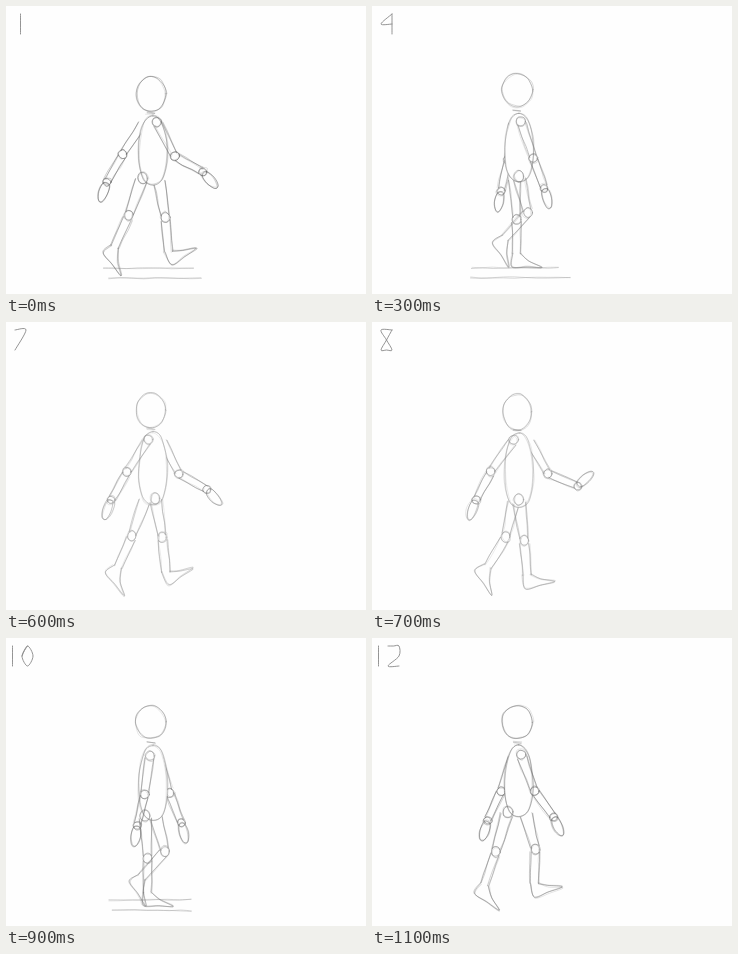
An HTML page with a canvas for the animation above (1200 ms loop, 360 px wide and 288 px high).

```html
<!DOCTYPE html>
<html lang="en">
<head>
<meta charset="utf-8">
<title>Pencil walk cycle</title>
<style>
  html, body { margin: 0; width: 100%; height: 100%; overflow: hidden; background: #fefefe; }
  canvas { display: block; width: 360px; height: 288px; }
</style>
</head>
<body>
<canvas id="stage"></canvas>
<script>
const STEP = 100, COUNT = 12, TAU = Math.PI * 2;
const THIGH = 40, SHIN = 36.5, FOOT = 30, UPPER = 39, FORE = 32, HAND = 21;
const { sin, cos, hypot, round, sign, abs } = Math;

const canvas = document.getElementById('stage');
const ctx = canvas.getContext('2d');
const ratio = window.devicePixelRatio || 1;
canvas.width = 360 * ratio;
canvas.height = 288 * ratio;
ctx.scale(ratio, ratio);
ctx.lineCap = ctx.lineJoin = 'round';

// numeral strokes as walks over a 3 x 3 grid numbered like a phone keypad
const numerals = ['248624', '28', '123679', '1235987', '346/39', '3214697', '1478964', '137', '31598753', '3214639'];

// Periodic motion: mean plus cosine and sine amounts of each harmonic
function cycle(t, mean, ...parts) {
  return parts.reduce((sum, [c, s], k) => sum + c * cos((k + 1) * t) + s * sin((k + 1) * t), mean);
}

// Limb angles in degrees: 0 hangs straight down, positive swings forward
const swing = {
  thigh: t => cycle(t, 1.8, [-14.9, 5.6], [-6.9, -1.3]),
  shin: t => cycle(t, -14.9, [-15.3, -17], [5.8, -1.4], [0.4, 3.8]),
  foot: t => cycle(t, 18.8, [35.6, 20.7], [-10, 8.1], [7.5, -6.7]),
  upper: t => cycle(t, 1.1, [30.4, 13.1], [-4, -2]),
  fore: t => cycle(t, 9.8, [44.8, 16.8], [5.9, 7.9]),
  // the wrist flicks up at the very front of the swing
  hand: t => 0.7 * swing.fore(t) + 85 * Math.max(0, cos(t - TAU / 12)) ** 40
};

let seed = 1;
function rand() {
  seed = (seed * 16807) % 2147483647;
  return seed / 2147483647;
}
const jitter = amount => (rand() - 0.5) * 2 * amount;
const lerp = (a, b, t) => [a[0] + (b[0] - a[0]) * t, a[1] + (b[1] - a[1]) * t];
const gap = (a, b) => hypot(b[0] - a[0], b[1] - a[1]);
const range = (n, fn) => Array.from({ length: n }, (_, i) => fn(i));

function reach([x, y], degrees, size) {
  const a = degrees * TAU / 360;
  return [x + sin(a) * size, y + cos(a) * size];
}

function trace(pts, closed) {
  const n = pts.length;
  const at = i => closed ? pts[(i + n) % n] : pts[Math.max(0, Math.min(n - 1, i))];
  ctx.beginPath();
  ctx.moveTo(...pts[0]);
  for (let i = 0; i < (closed ? n : n - 1); i++) {
    const [p, a, b, q] = [at(i - 1), at(i), at(i + 1), at(i + 2)];
    ctx.bezierCurveTo(a[0] + (b[0] - p[0]) / 6, a[1] + (b[1] - p[1]) / 6,
      b[0] - (q[0] - a[0]) / 6, b[1] - (q[1] - a[1]) / 6, b[0], b[1]);
  }
}

function pencil(tone) {
  const g = 190 - tone * 18;
  ctx.strokeStyle = `rgb(${g},${g},${g})`;
}

// Several faint, wobbly passes over the same curve
function sketch(pts, closed = false, passes = 3) {
  for (let i = 1; i <= passes; i++) {
    const dx = jitter(i * 0.3), dy = jitter(i * 0.3), wobble = 0.25 + i * 0.2;
    ctx.lineWidth = 0.9 - i * 0.1;
    ctx.globalAlpha = 0.65 - i * 0.12;
    trace(pts.map(([x, y]) => [x + dx + jitter(wobble), y + dy + jitter(wobble)]), closed);
    ctx.stroke();
  }
  ctx.globalAlpha = 1;
}

function line(a, b, passes) {
  const n = Math.max(1, round(gap(a, b) / 11));
  sketch(range(n + 1, i => lerp(a, b, i / n)), false, passes);
}

function oval([x, y], rx, ry = rx) {
  const n = rx > 9 ? 14 : 8;
  sketch(range(n, i => [x + rx * cos(i / n * TAU), y + ry * sin(i / n * TAU)]), true);
}

// The two edge points of a limb at fraction t
function sides(a, b, t, width) {
  const k = width / 2 / (gap(a, b) || 1);
  const nx = (a[1] - b[1]) * k, ny = (b[0] - a[0]) * k;
  const [x, y] = lerp(a, b, t);
  return [[x + nx, y + ny], [x - nx, y - ny]];
}

function tube(a, b, wa, wb) {
  const top = sides(a, b, 0.08, wa), end = sides(a, b, 0.94, wb);
  top.forEach((p, i) => line(p, end[i]));
}

function arm(shoulder, t, tone, near) {
  const elbow = reach(shoulder, swing.upper(t), UPPER);
  const wrist = reach(elbow, swing.fore(t), FORE);
  const tip = reach(wrist, swing.hand(t), HAND);
  pencil(tone);
  tube(shoulder, elbow, 9, 7);
  if (near) oval(shoulder, 4.6);
  pencil(tone + 1);
  tube(elbow, wrist, 8, 7);
  oval(elbow, 4.3);
  oval(wrist, 3.9);
  const edges = [[0.08, 6], [0.55, 9], [0.95, 4]].map(([f, w]) => sides(wrist, tip, f, w));
  sketch([...edges.map(e => e[0]), ...edges.map(e => e[1]).reverse()], true);
}

function leg(hip, t, tone, near) {
  const knee = reach(hip, swing.thigh(t), THIGH - 3 * sin(t));
  const ankle = reach(knee, swing.shin(t), SHIN);
  const pitch = swing.foot(t);
  const heel = reach(reach(ankle, -pitch, 11), 90 - pitch, -4);
  const toe = reach(heel, 90 - pitch, FOOT);
  pencil(tone);
  tube(hip, knee, 12, 8);
  tube(knee, ankle, 9, 8);
  if (near) oval(hip, 4.8, 5.6);
  oval(knee, 4.4, 5);
  const [front, back] = sides(knee, ankle, 0.94, 8).sort((a, b) => b[0] - a[0]);
  const instep = reach(lerp(heel, toe, 0.55), -pitch, -6);
  sketch([back, heel, lerp(heel, toe, 0.5), toe, instep, front]);
}

// A rounded box that narrows towards the neck
function torso(top, bottom, tone) {
  const soft = v => sign(v) * abs(v) ** 0.8;
  const pts = range(14, i => {
    const a = i / 14 * TAU, down = -cos(a);
    return [147 + 15.5 * soft(sin(a)) * (0.92 + 0.08 * down), (top + bottom) / 2 + (bottom - top) / 2 * down];
  });
  ctx.fillStyle = '#fefefe';
  trace(pts, true);
  ctx.fill();
  pencil(tone);
  sketch(pts, true);
  line([141, top - 3], [149, top - 2]);
}

function numeral(n) {
  pencil(3);
  const digits = [...String(n)];
  digits.forEach((digit, place) => {
    const left = digits.length === 1 ? 9 : place ? 16 : 1;
    for (const walk of numerals[digit].split('/')) {
      const pts = [...walk].map(k => [left + (k - 1) % 3 * 5.5, 8 + Math.floor((k - 1) / 3) * 10]);
      ctx.lineWidth = 0.9;
      trace(pts, false);
      ctx.stroke();
    }
  });
}

function ground() {
  pencil(2);
  for (const y of [262, 272]) line([102 + jitter(5), y], [190 + jitter(8), y + jitter(1)], 2);
}

function draw(n) {
  seed = n * 7919 + 13;
  const turn = n / COUNT * TAU;
  const t = turn - TAU / COUNT;
  const bounce = cos(2 * (turn - TAU / 6));
  const hipY = 174 - 4 * sin(turn);
  const shoulderY = 116.5 - 1.5 * sin(turn);
  const lean = cos(turn - TAU / 6);
  const tone = 3.6 + cos(t);

  ctx.fillStyle = '#fefefe';
  ctx.fillRect(0, 0, 360, 288);
  numeral(n);
  if (cos(n * TAU / 5) > 0) ground();

  // the far limbs run half a cycle behind the near ones
  arm([146.5 - 10 * lean, shoulderY], t + TAU / 2, tone, false);
  leg([146 + 7.5 * cos(turn), hipY], t + TAU / 2, tone, false);
  torso(108.5 + 2.5 * bounce, hipY + 6 + 2 * bounce, tone - 0.6);
  leg([143 - 7.5 * cos(turn), hipY], t, tone, true);
  arm([146.5 + 5 * lean, shoulderY], t, tone, true);
  pencil(tone);
  oval([145, 86 + 4 * bounce], 15 - 0.7 * bounce, 17 + bounce);
}

let shown = 0;
function tick() {
  const n = Math.floor(performance.now() / STEP) % COUNT + 1;
  if (n !== shown) draw(shown = n);
  requestAnimationFrame(tick);
}
tick();
</script>
</body>
</html>
```
